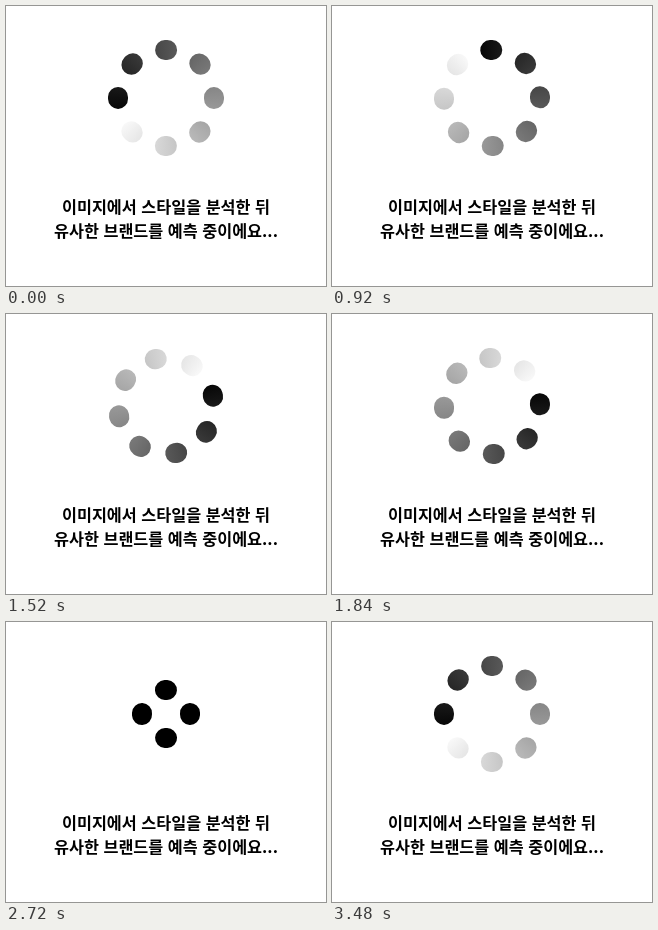
An HTML page with a canvas that plays this animation: 320x280 px, repeating every 3620 ms.

```html
<!DOCTYPE html>
<html lang="ko">
<head>
<meta charset="utf-8">
<title>Loading</title>
<style>
  html, body { margin: 0; width: 100%; height: 100%; overflow: hidden; background: #fff; }
  canvas { position: absolute; left: 0; top: 0; width: 320px; height: 280px; }
  p {
    position: absolute; left: 0; top: 188px; width: 320px; margin: 0;
    font: bold 16.26px/24px "Noto Sans CJK KR", "Noto Sans KR", "Noto Sans CJK", sans-serif;
    color: #000; text-align: center; white-space: nowrap;
  }
</style>
</head>
<body>
<canvas></canvas>
<p>이미지에서 스타일을 분석한 뒤<br>유사한 브랜드를 예측 중이에요...</p>
<script>
const LOOP = 3620, TICK = 40;
const WIDE = 48, TIGHT = 24, STROKE = 20, DASH = 2;
const PERIOD = 2 * Math.PI * WIDE / 8;
const FIRST = -6, SECOND = 1074, SHRINK = 2143, GROW = 2820;
const TURN_LAG = 6;
const rad = deg => deg * Math.PI / 180;
const clamp = v => Math.min(1, Math.max(0, v));

// Unit spring response, t in ms
function spring(stiffness, damping, t) {
  if (t <= 0) return 0;
  const s = t / 1000, d = damping / 2, k = stiffness - d * d, w = Math.sqrt(Math.abs(k));
  const [c, n] = k > 0 ? [Math.cos(w * s), Math.sin(w * s)] : [Math.cosh(w * s), Math.sinh(w * s)];
  return 1 - Math.exp(-d * s) * (c + d / w * n);
}
const slow = t => spring(80, 20, t);
const quick = t => spring(300, 20, t);

const canvas = document.querySelector('canvas');
const ctx = canvas.getContext('2d');
const dpr = window.devicePixelRatio || 1;
canvas.width = 320 * dpr;
canvas.height = 280 * dpr;

// The seam lies midway between two dots
const sweep = ctx.createConicGradient(rad(157.5), 0, 0);
sweep.addColorStop(0, '#000');
sweep.addColorStop(1, '#fff');

// Dashes are fitted to each quadrant, so a small ring holds fewer dots
function ring(radius, paint, alpha) {
  const count = 4 * Math.max(1, Math.round(radius * Math.PI / 2 / PERIOD));
  const half = DASH / 2 / radius;
  ctx.globalAlpha = alpha;
  ctx.strokeStyle = paint;
  ctx.beginPath();
  for (let i = 0; i < count; i++) {
    const a = i * 2 * Math.PI / count;
    ctx.moveTo(radius * Math.cos(a - half), radius * Math.sin(a - half));
    ctx.arc(0, 0, radius, a - half, a + half);
  }
  ctx.stroke();
}

function draw(t) {
  let turn, radius = WIDE, layers = [[sweep, 1]];
  if (t < SECOND) {
    turn = slow(t - FIRST);
  } else if (t < SHRINK) {
    turn = 1 + slow(t - SECOND);
  } else if (t < GROW) {
    const p = quick(t - SHRINK), o = clamp(p);
    turn = 2 + quick(t - SHRINK - TURN_LAG);
    radius = WIDE + (TIGHT - WIDE) * p;
    layers = [[sweep, 1 - o], ['#000', o]];
  } else {
    const p = quick(t - GROW), o = clamp(p);
    turn = 3 + quick(t - GROW - TURN_LAG);
    radius = TIGHT + (WIDE - TIGHT) * p;
    layers = [['#000', 1 - o], [sweep, o]];
  }
  ctx.setTransform(dpr, 0, 0, dpr, 0, 0);
  ctx.clearRect(0, 0, 320, 280);
  ctx.translate(160, 92);
  ctx.rotate(rad(90 * turn));
  ctx.lineWidth = STROKE;
  ctx.lineCap = 'round';
  for (const [paint, alpha] of layers) ring(radius, paint, alpha);
}

const start = performance.now();
function frame() {
  const t = (performance.now() - start) % LOOP;
  draw(Math.floor(t / TICK) * TICK);
  requestAnimationFrame(frame);
}
frame();
</script>
</body>
</html>
```
